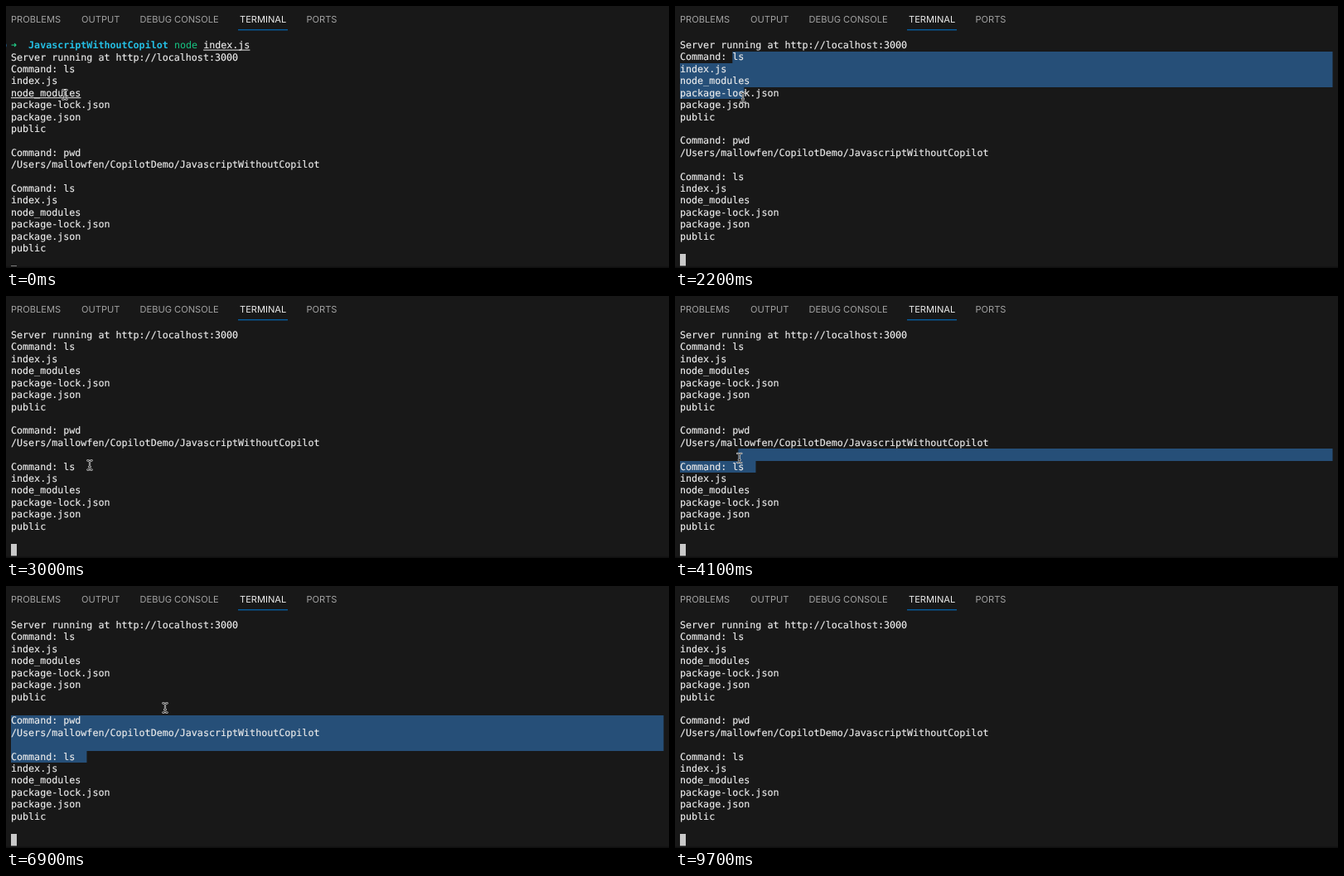
These frames come from a looping animation (800x316 px, 9800 ms). An HTML page:

```html
<!DOCTYPE html>
<html lang="en">
<head>
<meta charset="utf-8">
<title>Terminal</title>
<style>
  html, body { margin: 0; width: 100%; height: 100%; overflow: hidden; background: #181818; }
  svg { display: block; width: 800px; height: 316px; }
  text { white-space: pre; text-rendering: geometricPrecision; }
  .tabs { font: 11.1px Inter, "Liberation Sans", sans-serif; fill: #a2a2a2; }
  .tabs .active { fill: #ececec; }
  .term { font: 11.685px "DejaVu Sans Mono", monospace; fill: #ececec; }
  .term text { stroke: #ececec; stroke-width: .15px; }
  .term .dir { fill: #24bfe4; stroke: none; font-weight: bold; }
  .term .ok { fill: #16c784; stroke: none; }
  .term .arrow { fill: #23d18b; stroke: none; font-weight: bold; }
  .beam { fill: none; stroke-linecap: round; }
</style>
</head>
<body>
<svg viewBox="0 0 800 316">
  <defs>
    <clipPath id="view"><rect y="40" width="800" height="274"/></clipPath>
    <path id="beam" d="M-2.6 -5.6Q0 -5.6 0 -4Q0 -5.6 2.6 -5.6M0 -4V4M-2.6 5.6Q0 5.6 0 4Q0 5.6 2.6 5.6M-1 2H1"/>
  </defs>
  <g class="tabs">
    <text x="6" y="19.5">PROBLEMS</text>
    <text x="91" y="19.5">OUTPUT</text>
    <text x="161.5" y="19.5">DEBUG CONSOLE</text>
    <text x="282" y="19.5" class="active">TERMINAL</text>
    <text x="362.5" y="19.5">PORTS</text>
    <rect x="280" y="28.3" width="60" height="1" fill="#0078d4"/>
  </g>
  <path id="selection" fill="#264f78"/>
  <g clip-path="url(#view)">
    <g id="lines" class="term"></g>
  </g>
  <rect y="314.5" width="800" height="1.5" fill="#101010"/>
  <g id="mouse" class="beam">
    <use href="#beam" stroke="#e6e6e6" stroke-width="2.2"/>
    <use href="#beam" stroke="#222" stroke-width=".9"/>
  </g>
</svg>
<script>
const LOOP = 9800, STEP = 100, SCROLL_AT = 500, LEAVE_AT = 9700;
const LEFT = 6, RIGHT = 793.5, TOP = 40.3, ROW = 14.41, COL = 7.035;

const files = ["index.js", "node_modules", "package-lock.json", "package.json", "public"];
const url = "http://localhost:3000";
const path = "/Users/mallowfen/CopilotDemo/JavascriptWithoutCopilot";
const lines = ["", "Server running at " + url, "Command: ls", ...files, "",
  "Command: pwd", path, "", "Command: ls", ...files];

// Pointer moves: start time, end time, x, y; it rests in between
const home = [71, 107];
const moves = [
  [0, 1200, 68, 47],
  [1300, 1900, 70, 62],
  [2000, 2500, 104, 199],
  [2600, 3000, 101, 204],
  [3100, 3600, 96, 205],
  [3900, 4600, 4, 157],
  [4700, 4900, 60, 124],
  [5200, 6000, 180, 190],
  [6000, 6300, 210, 158],
  [6300, 6900, 192, 147],
  [7200, 7900, 162, 118],
  [8500, 8700, 176, 112],
  [8900, 9300, 205, 111],
  [9500, 9600, 207, 49]
];
const drags = [
  { start: 2000, end: 2700, clear: 2900 },
  { start: 3900, end: 4600, clear: 7000 }
];

const $ = id => document.getElementById(id);
const group = $("lines");

function add(tag, attrs, content = "") {
  const el = document.createElementNS("http://www.w3.org/2000/svg", tag);
  for (const key in attrs) el.setAttribute(key, attrs[key]);
  el.textContent = content;
  group.append(el);
  return el;
}
const colX = col => LEFT + col * COL;
const write = (row, col, str, cls = "") =>
  add("text", { x: colX(col), y: 51.1 + row * ROW, class: cls }, str);
const underline = (row, col, length) =>
  add("rect", { x: colX(col), y: 52.6 + row * ROW, width: length * COL, height: 1 });

add("circle", { cx: -3.5, cy: 47.5, r: 4.2, fill: "#1d5f96" });
write(0, 0, "➜", "arrow");
write(0, 3, "JavascriptWithoutCopilot", "dir");
write(0, 28, "node", "ok");
write(0, 33, "index.js");
underline(0, 33, 8);
lines.forEach((str, row) => str && write(row, 0, str));
add("rect", { x: LEFT, y: 299 + ROW, width: 7, height: 14.4, fill: "#c9c9c9" });

// Every file, path and address is underlined while hovered
const links = lines.flatMap((str, row) => {
  const target = [...files, path, url].find(item => str.endsWith(item));
  if (!target) return [];
  const col = str.length - target.length;
  return [{ row, col, end: str.length, el: underline(row, col, target.length) }];
});

function pointer(t) {
  let [x, y] = home;
  for (const [start, end, toX, toY] of moves) {
    const k = Math.min(1, Math.max(0, (t - start) / (end - start)));
    const ease = k * k * (3 - 2 * k);
    x += (toX - x) * ease;
    y += (toY - y) * ease;
  }
  return [x, y];
}

function cell(t) {
  const [x, y] = pointer(t);
  return { row: Math.floor((y - 1 - TOP) / ROW), col: Math.max(0, Math.round((x - LEFT) / COL)) };
}

function selectionPath(drag, t) {
  const [a, b] = [cell(drag.start), cell(Math.min(t, drag.end))]
    .sort((p, q) => p.row - q.row || p.col - q.col);
  let d = "";
  for (let row = a.row; row <= b.row; row++) {
    const x0 = row === a.row ? colX(a.col) : LEFT;
    const x1 = row === b.row ? colX(b.col) : RIGHT;
    const y0 = Math.round(TOP + row * ROW), y1 = Math.round(TOP + (row + 1) * ROW);
    d += `M${x0} ${y0}H${x1}V${y1}H${x0}Z`;
  }
  return d;
}

function draw(t) {
  const shift = t >= SCROLL_AT ? 1 : 0;
  const visible = t < LEAVE_AT;
  const [x, y] = pointer(t);
  const row = Math.floor((y - 1 - TOP) / ROW) + shift;
  const col = (x - LEFT) / COL;
  const drag = drags.find(d => t > d.start && t < d.clear);
  const dragging = drag && t <= drag.end;

  group.setAttribute("transform", `translate(0 ${-shift * ROW})`);
  for (const link of links) {
    const over = visible && !dragging && link.row === row && col >= link.col && col <= link.end;
    link.el.setAttribute("visibility", over ? "visible" : "hidden");
  }
  $("selection").setAttribute("d", drag ? selectionPath(drag, t) : "");
  $("mouse").setAttribute("transform", `translate(${x} ${y})`);
  $("mouse").setAttribute("visibility", visible ? "visible" : "hidden");
}

const origin = performance.now();
function tick() {
  const t = (performance.now() - origin) % LOOP;
  draw(Math.floor(t / STEP) * STEP);
  requestAnimationFrame(tick);
}
tick();
</script>
</body>
</html>
```
